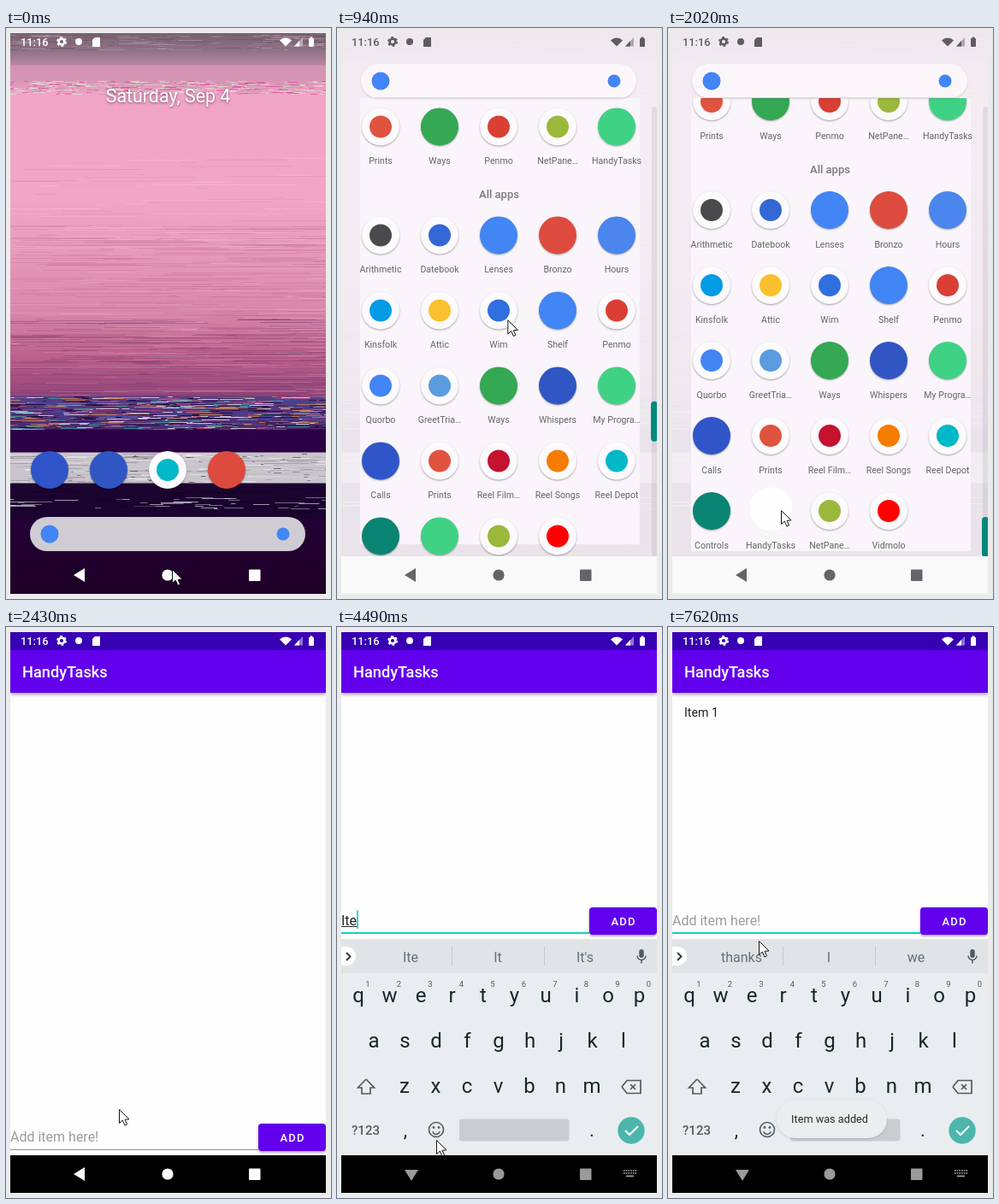
These frames come from a looping animation (380x668 px, 8000 ms). An HTML page with a canvas:

```html
<!DOCTYPE html>
<html lang="en">
<head>
<meta charset="utf-8">
<title>Adding a task</title>
<style>
html, body { margin: 0; width: 100%; height: 100%; overflow: hidden; background: #ebebec; }
canvas { display: block; }
</style>
</head>
<body>
<canvas id="stage" width="380" height="668"></canvas>
<script>
const LOOP = 8000, L = 5, R = 374, TOP = 6, BOTTOM = 662, NAV = 618;
let c = document.getElementById('stage').getContext('2d');

const clamp = (v, a = 0, b = 1) => Math.min(b, Math.max(a, v));
const easeOut = k => 1 - (1 - k) ** 3;
const smooth = k => k * k * (3 - 2 * k);

// Value at time t along keys [time, value, easing into this key]
function track(t, keys) {
  let i = keys.findIndex(k => k[0] > t);
  if (i < 0) return keys[keys.length - 1][1];
  if (i === 0) return keys[0][1];
  const [t0, a] = keys[i - 1], [t1, b, ease] = keys[i];
  const k = (t - t0) / (t1 - t0);
  return a + (b - a) * (ease ? ease(k) : k);
}

function rect(x, y, w, h, color, r = 0) {
  c.fillStyle = color;
  c.beginPath();
  c.roundRect(x, y, w, h, r);
  c.fill();
}
function disc(x, y, r, color) {
  c.fillStyle = color;
  c.beginPath();
  c.arc(x, y, r, 0, 7);
  c.fill();
}
function poly(points, fill, stroke, width = 1) {
  c.beginPath();
  for (let i = 0; i < points.length; i += 2) c.lineTo(points[i], points[i + 1]);
  if (fill) { c.closePath(); c.fillStyle = fill; c.fill(); }
  if (stroke) { c.strokeStyle = stroke; c.lineWidth = width; c.stroke(); }
}
function text(s, x, y, size, color, align = 'left', weight = 400) {
  c.font = `${weight} ${size}px Roboto, sans-serif`;
  c.textAlign = align;
  c.fillStyle = color;
  c.fillText(s, x, y);
}
function shadow(color, blur, y) {
  c.shadowColor = color;
  c.shadowBlur = blur;
  c.shadowOffsetY = y;
}
const noShadow = () => shadow('transparent', 0, 0);
function layer(alpha, draw) {
  if (alpha <= 0) return;
  c.save();
  c.globalAlpha *= alpha;
  draw();
  c.restore();
}

// ---- Wallpaper: gradient with seeded horizontal streaks
const wall = document.createElement('canvas');
function paintWall() {
  wall.width = 380;
  wall.height = 668;
  const w = wall.getContext('2d'), g = w.createLinearGradient(0, 0, 0, 668);
  const stops = '6 78606f,26 8f7184,43 b587a0,44 d395b2,61 d794b4,78 f0a5c4,200 f1a6c6,260 e89aba,' +
    '330 d988ab,365 c66f95,385 bb5f8b,430 93457a,431 5a3f80,469 4a2a6a,470 2f0048,496 2b0042,' +
    '497 c9c5cc,532 c9c5cc,533 1c0430,574 1a0330,575 240036,662 1e0026';
  for (const s of stops.split(',')) {
    const [y, color] = s.split(' ');
    g.addColorStop(y / 668, '#' + color);
  }
  w.fillStyle = g;
  w.fillRect(0, 0, 380, 668);
  let seed = 11;
  const rnd = () => (seed = seed * 16807 % 2147483647) / 2147483647;
  // top, bottom, count, longest, alpha, colours
  const bands = [
    [8, 26, 130, 40, .35, '#d8c4d0 #5d4a58 #a9a'],
    [62, 78, 420, 12, .55, '#f6d5e4 #a98a9c #cfc #d39'],
    [150, 260, 70, 150, .35, '#d58bab #f8c0d8 #c98aa6'],
    [230, 370, 260, 190, .3, '#c06f94 #f4b4cf #b9688f'],
    [340, 430, 260, 170, .35, '#8d3f70 #d98bb0 #74386a'],
    [378, 405, 14, 80, .5, '#8d7a96'],
    [431, 470, 620, 34, .8, '#3c4aa8 #e6dcea #2a0a48 #b04a80 #d08a5a #3f9aa0 #6a3f98 #1d0636'],
    [498, 532, 170, 60, .6, '#f4f2f6 #8f8a96 #b5b0ba #ddd'],
    [498, 532, 60, 8, .6, '#7a4a58 #4a5a8a #333'],
    [549, 563, 45, 36, .7, '#d8d0dc #9a90a4'],
    [535, 574, 30, 60, .5, '#0c0118']
  ];
  for (const [y0, y1, n, len, alpha, list] of bands) {
    const colors = list.split(' ');
    w.globalAlpha = alpha;
    for (let i = 0; i < n; i++) {
      w.fillStyle = colors[Math.floor(rnd() * colors.length)];
      w.fillRect(Math.floor(rnd() * 400) - 20, Math.floor(y0 + rnd() * (y1 - y0)), 2 + rnd() * len, 1);
    }
  }
}

// ---- System bars
function statusBar(color) {
  text('11:16', 17, 21, 12.8, color, 'left', 500);
  c.strokeStyle = color;
  c.lineWidth = 2.6;
  c.beginPath(); c.arc(65, 16, 3.4, 0, 7); c.stroke();
  c.setLineDash([2.6, 2.7]);
  c.lineWidth = 2;
  c.beginPath(); c.arc(65, 16, 5, 0, 6.28); c.stroke();
  c.setLineDash([]);
  disc(85, 16, 4, color);
  poly([101, 14, 104, 11, 110, 11, 110, 22, 101, 22], color);
  c.fillStyle = color;
  c.beginPath();
  c.moveTo(327, 21.5);
  c.arc(327, 21.5, 10, -2.35, -.79);
  c.fill();
  layer(.45, () => poly([337, 21.5, 347, 21.5, 347, 11], color));
  poly([337, 21.5, 343, 21.5, 343, 15], color);
  rect(354, 12, 6, 10, color, 1);
  rect(355.5, 10.5, 3, 2, color);
}
function navIcons(color, typing) {
  if (typing) {
    poly([79, 635, 95, 635, 87, 648], color);
    for (let i = 0; i < 6; i++) for (let j = 0; j < 2; j++) rect(335 + i * 2.7, 635 + j * 3, 1.6, 1.8, color);
    rect(338, 641.5, 9, 1.8, color);
  } else poly([79, 640, 92, 632, 92, 648], color);
  disc(189, 640, 6.6, color);
  rect(284, 633.5, 13.5, 13.5, color, 1);
}

// ---- Launcher: [name, colour, sits on a white plate]
const apps = [
  ['Arithmetic', '#4a4a4c', 1], ['Datebook', '#3367d6', 1], ['Lenses', '#4285f4'], ['Bronzo', '#dd4b3e'], ['Hours', '#4a86ee'],
  ['Kinsfolk', '#039be5', 1], ['Attic', '#fbc02d', 1], ['Wim', '#2f6fe0', 1], ['Shelf', '#4285f4'], ['Penmo', '#d93f33', 1],
  ['Quorbo', '#4285f4', 1], ['GreetTria…', '#5b9be0', 1], ['Ways', '#34a853'], ['Whispers', '#3056c4'], ['My Progra…', '#3fd285'],
  ['Calls', '#2f55c8'], ['Prints', '#e0533f', 1], ['Reel Film…', '#c4122f', 1], ['Reel Songs', '#f57c00', 1], ['Reel Depot', '#00b8c8', 1],
  ['Controls', '#0b8573'], ['HandyTasks', '#3fd285'], ['NetPane…', '#9ab83c', 1], ['Vidmolo', '#ff0000', 1]
];
const column = i => 51 + 69 * (i % 5);

function icon([, color, plate], x, y) {
  shadow('rgba(0,0,0,.35)', 2, 1);
  disc(x, y, 22, plate ? '#fdfafd' : color);
  noShadow();
  if (plate) disc(x, y, 13, color);
}
function entry(app, x, y) {
  icon(app, x, y);
  text(app[0], x, y + 44, 10.6, '#68636b', 'center');
}

function launcher(t) {
  const S = track(t, [[430, 592], [680, 267], [900, 62, easeOut]]);   // search bar centre
  const p = (592 - S) / 530, open = p > .99;
  const scroll = track(t, [[880, 0], [1180, 47], [1240, 54], [1310, 56, easeOut], [1640, 39, smooth]]);

  c.drawImage(wall, 0, 0);
  rect(L, TOP, 369, 656, `rgba(0,0,0,${Math.min(.27, p * .45)})`);
  layer(1 - p * 1.8, () => {
    shadow('rgba(0,0,0,.5)', 3, 1);
    text('Saturday, Sep 4', 189.5, 87, 21.4, '#fff', 'center');
    noShadow();
  });

  const k = clamp((S - 62) / 60);
  layer(Math.min(.93, p * 1.6), () => rect(L, S - 51 - 8 * (1 - k), 369, 700, '#faf5fa', 14 * k));
  if (open) {
    const extra = t >= 1300 ? 8 : 0;
    rect(27, 82, 327, 522 + extra, '#f9f5fa');
  }

  layer(clamp((p - .25) / .52), () => {
    c.beginPath();
    c.rect(L, S + 20, 369, 700);
    c.clip();
    const y = S - scroll;
    [16, 12, 9, 22, 21].forEach((n, i) => entry(apps[n], column(i), y + 63));
    text('All apps', 189.5, y + 146.5, 13, '#7d7880', 'center', 500);
    apps.forEach((a, i) => entry(a, column(i), y + 190 + 88 * Math.floor(i / 5)));
    rect(368, S + 30, 6, 700, 'rgba(60,50,70,.09)', 3);
    rect(367, S + track(t, [[680, 206], [1150, 510]]), 8, 47, '#00897b', 4);
  });

  layer(1 - p * 1.8, () => [15, 13, 19, 3].forEach((n, i) => icon(apps[n], column(i), S - 75)));

  const fade = clamp(1 - p * 1.65);
  layer(fade, () => rect(28, S - 20, 322, 40, '#d0ccd3', 20));
  layer(1 - fade, () => {
    shadow('rgba(60,40,60,.18)', 2, 1);
    rect(28, S - 20, 322, 40, '#faf6fa', 20);
    noShadow();
    if (open) rect(42, 81, 294, 1, '#e6d8e0');
  });
  disc(51, S, 10.5, '#4285f4');
  disc(324, S, 7.5, '#4285f4');

  if (open) rect(L, NAV, 369, 44, '#f9f9fa');
  navIcons(open ? '#66646a' : '#fff');
  statusBar(p > .95 ? '#5f5a63' : '#fff');
}

// ---- Keyboard
const INK = '#16262e', GREY = '#505c63';
function keyboard(words) {
  rect(L, 365, 369, 253, '#e9edf0');
  rect(L, 365, 369, 40, '#e0e4e7');
  rect(-10, 374, 32, 22, '#fff', 11);
  poly([11, 381, 15.5, 385.5, 11, 390], null, '#333', 1.8);
  if (words.length) {
    words.forEach((s, i) => text(s, 86 + 102 * i, 391.5, 16, '#64707a', 'center'));
    rect(134, 374, 1, 22, '#c3c9cd');
    rect(242, 374, 1, 22, '#c3c9cd');
  }
  rect(353.3, 377, 5.4, 10, GREY, 2.7);
  c.strokeStyle = GREY;
  c.lineWidth = 1.4;
  c.beginPath(); c.arc(356, 384.5, 5, 0, Math.PI); c.stroke();
  rect(355.2, 389.5, 1.6, 4, GREY);

  const row = (keys, x, y) => [...keys].forEach((s, i) => text(s, x + 36.5 * i, y, 24, INK, 'center'));
  row('qwertyuiop', 25, 439);
  row('asdfghjkl', 43, 492);
  row('zxcvbnm', 79, 545);
  [...'1234567890'].forEach((s, i) => text(s, 36 + 36.5 * i, 421, 9.5, GREY, 'center'));

  poly([34, 529, 43.5, 539, 39, 539, 39, 546, 29, 546, 29, 539, 24.5, 539, 34, 529], null, GREY, 1.7);
  poly([333, 538, 339, 530.5, 355, 530.5, 355, 545.5, 339, 545.5, 333, 538], null, GREY, 1.7);
  poly([343, 535, 349, 541], null, GREY, 1.7);
  poly([349, 535, 343, 541], null, GREY, 1.7);

  text('?123', 33.5, 594, 15, GREY, 'center', 500);
  text(',', 80, 596, 22, INK, 'center');
  text('.', 298, 596, 22, INK, 'center');
  c.strokeStyle = GREY;
  c.lineWidth = 1.6;
  c.beginPath(); c.arc(116, 588, 8.5, 0, 7); c.stroke();
  c.beginPath(); c.arc(116, 589, 4.4, .3, 2.84); c.stroke();
  disc(113, 585.5, 1.4, GREY);
  disc(119, 585.5, 1.4, GREY);
  rect(143, 575.5, 128.5, 26, '#c8cdd0', 3);
  disc(344, 589, 15.7, '#4db6ac');
  poly([337, 589, 342, 594, 352, 584], null, '#fff', 2);
}

// ---- Task app: [time, field text, suggestions]
const START = ['thanks', 'I', 'we'];
const typing = [
  [3120, '', START],
  [3990, 'I', ['I', "I'm", 'It']],
  [4300, 'It', ['It', "It's", 'Its']],
  [4490, 'Ite', ['Ite', 'It', "It's"]],
  [4930, 'Item', ['Item', 'Items', 'itemized']],
  [5100, 'Item ', ['is', 'in', 'I']],
  [5350, 'Item 1', []],
  [7050, '', START]
];

function field(t, focus, since, value) {
  if (value) text(value, 5, 348.5, 16, '#222');
  else text('Add item here!', 5, focus ? 348.5 : 601.5, 16, '#9c9c9c');
  if (!focus) { rect(L, 611, 290, 1, '#8c8c8c'); return; }
  rect(L, 357, 290, 2, '#14cfc0');
  c.font = '400 16px Roboto, sans-serif';
  const w = c.measureText(value).width;
  if (/[a-z]$/i.test(value)) rect(5, 350, w, 1, '#222');
  if (since && (t - since) % 1000 < 500) rect(5 + w, 331.5, 1.7, 21.5, '#14cfc0');
}

function addButton(t, y) {
  shadow('rgba(0,0,0,.4)', 3, 1.5);
  rect(295, y, 79, 32, '#6200ee', 4);
  noShadow();
  if (t >= 7050) layer(.24 * clamp(1 - (t - 7050) / 350), () => rect(295, y, 79, 32, '#fff', 4));
  c.letterSpacing = '1.2px';
  text('ADD', 335, y + 20.7, 13, '#fff', 'center', 500);
  c.letterSpacing = '0px';
}

function taskApp(t) {
  const focus = t >= 2930;
  const [since, value, words] = typing.filter(s => s[0] <= t).pop() || [0, '', []];
  rect(L, TOP, 369, 656, '#fefefe');
  shadow('rgba(0,0,0,.35)', 4, 1.5);
  rect(L, 27, 369, 50, '#6200ee');
  noShadow();
  rect(L, TOP, 369, 21, '#3700b3');
  statusBar('#fff');
  text('HandyTasks', 19, 59, 18.2, '#fff', 'left', 500);
  if (t >= 7050) text('Item 1', 19, 104.5, 14.2, '#222');
  if (t >= 2370) {
    field(t, focus, since, value);
    addButton(t, focus ? 328 : 581);
  }
  if (t >= 2870) {
    c.save();
    c.translate(0, 253 * (1 - easeOut(clamp((t - 2870) / 260))));
    keyboard(words);
    c.restore();
  }
  layer(clamp((t - 7120) / 300), () => {
    shadow('rgba(0,0,0,.12)', 3, 1);
    rect(127, 553, 129, 45, '#ebedef', 22);
    noShadow();
    text('Item was added', 189, 580, 12.7, '#2b2b2b', 'center');
  });
  rect(L, NAV, 369, 44, '#000');
  navIcons(focus ? '#9a9a9a' : '#fff', focus);
}

// ---- Pointer
const path = [
  [430, 194, 633], [680, 203, 338], [780, 203, 318], [1000, 198, 350], [1240, 196, 361],
  [1780, 132, 564], [2430, 132, 564], [2750, 116, 600], [6180, 116, 600],
  [6440, 321, 429], [6860, 340, 344], [7050, 340, 344], [7600, 106, 367]
];
function pointer(t) {
  const axis = n => track(t, path.map(k => [k[0], k[n], [1780, 2750, 7600].includes(k[0]) ? smooth : k[0] === 6860 ? easeOut : null]));
  c.save();
  c.translate(axis(1) + .5, axis(2) + .5);
  poly([0, 0, 0, 16, 3.8, 12.6, 6.5, 18.5, 9, 17.4, 6.6, 11.8, 11.5, 11.4, 0, 0], '#fff', '#111', 1);
  c.restore();
}

function frame() {
  const t = performance.now() % LOOP;
  rect(0, 0, 380, 668, '#ebebec');
  c.save();
  c.beginPath();
  c.rect(L, TOP, R - L, BOTTOM - TOP);
  c.clip();
  if (t < 2370) launcher(t);
  if (t >= 2020) {
    const k = easeOut(clamp((t - 2020) / 350)), mix = (a, b) => a + (b - a) * k;
    c.beginPath();
    c.roundRect(mix(97, L), mix(542, TOP), mix(46, 369), mix(46, 656), mix(23, 0));
    c.clip();
    taskApp(t);
  }
  c.restore();
  pointer(t);
  requestAnimationFrame(frame);
}
paintWall();
frame();
</script>
</body>
</html>
```
